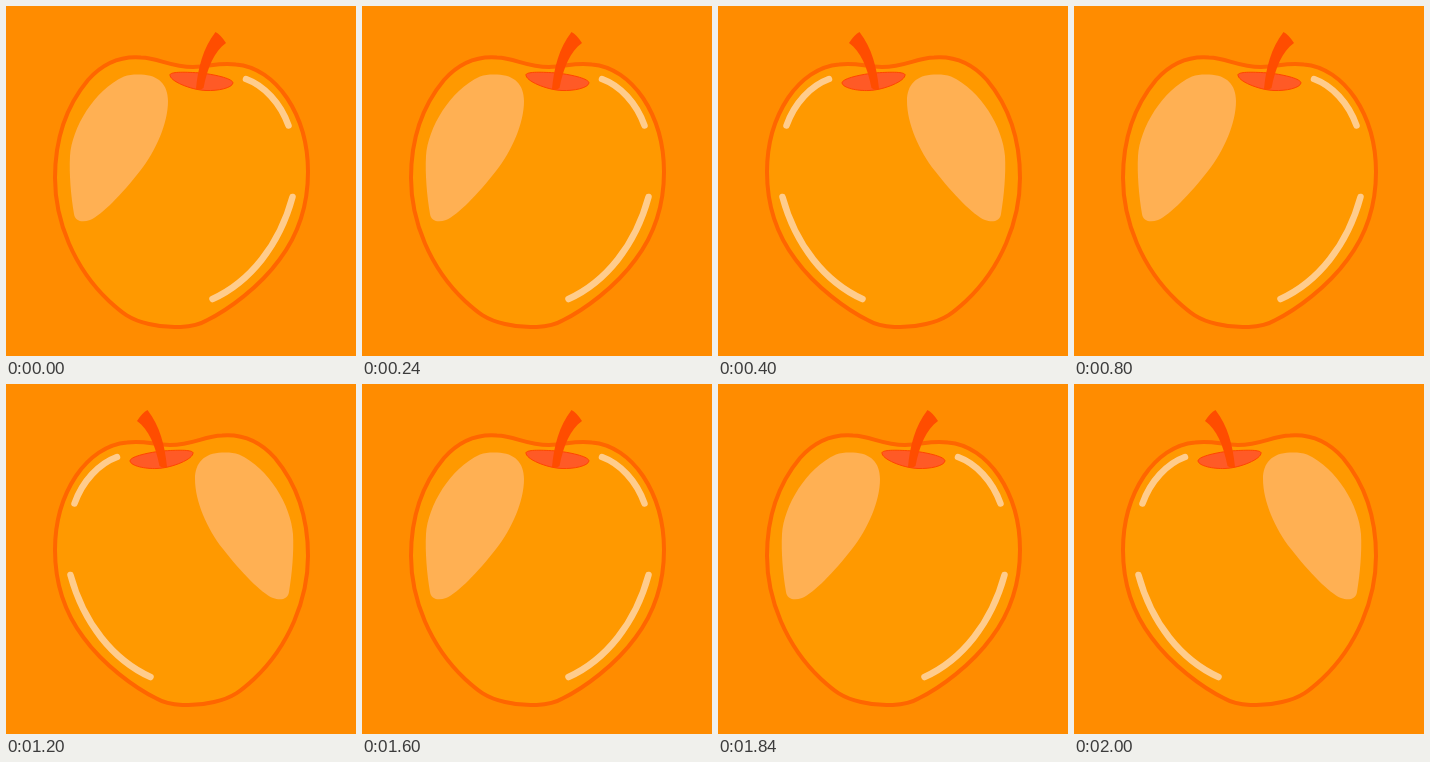
An HTML page that plays this animation: 350 px wide and 350 px high, repeating every 2400 ms.

```html
<!DOCTYPE html>
<html lang="en">
<head>
<meta charset="utf-8">
<title>Flipping apple</title>
<style>
  html, body { margin: 0; height: 100%; overflow: hidden; background: #ff8c00; }
  svg { display: block; width: 350px; height: 350px; }
</style>
</head>
<body>
<svg viewBox="0 0 350 350">
  <g id="apple">
    <path fill="#ff9900" stroke="#ff6600" stroke-width="4" d="M49 172
      C49 130 62 98 82 74 C98 56 116 50 135 51.5 C153 52 164 61 187 61
      C204 61 212 56 230 58.5 C250 60 268 73 281 92 C295 113 302 140 302 166
      C302 204 290.5 231 273.5 253.5 C253.5 281 222 304 200.5 314.5
      C188 322 163 323 143 318 C124 314 115 306 103 295 C68 262 49 215 49 172Z"/>
    <path fill="#ffb053" d="M64 150 C66 122 88 84 118 70.5 C123 68.5 129 68.3 135 68.5
      C153 69 162 79 162 95 C162 117 150 145 134 165 C116 188 96 209 84 214
      C76 217 69 215 68 208 C65 190 63 168 64 150Z"/>
    <path fill="#ff5a26" stroke="#ff4500" d="M164 68.5 C166 65.5 180 66 195 67
      C212 69 227 73 227 77 C226 82 212 85 200 84.5 C185 84 163 75 164 68.5Z"/>
    <path fill="#ff4d00" d="M209.5 26 Q215 29 220 37 C208 46 202 60 197.5 82
      Q194 85 190 83 C192 62 197 42 209.5 26Z"/>
    <g fill="none" stroke="#ffcc8c" stroke-width="6.5" stroke-linecap="round">
      <path d="M240 73 C258 79.5 274.500 97 282.5 119.500"/>
      <path d="M286.5 191 C273.500 239 244 276 206.5 293"/>
    </g>
  </g>
</svg>
<script>
  const STEP = 400;
  const apple = document.getElementById("apple");

  function draw() {
    const mirrored = Math.floor(performance.now() / STEP) % 2 === 1;
    apple.setAttribute("transform", mirrored ? "translate(351 0) scale(-1 1)" : "");
    requestAnimationFrame(draw);
  }
  draw();
</script>
</body>
</html>
```
